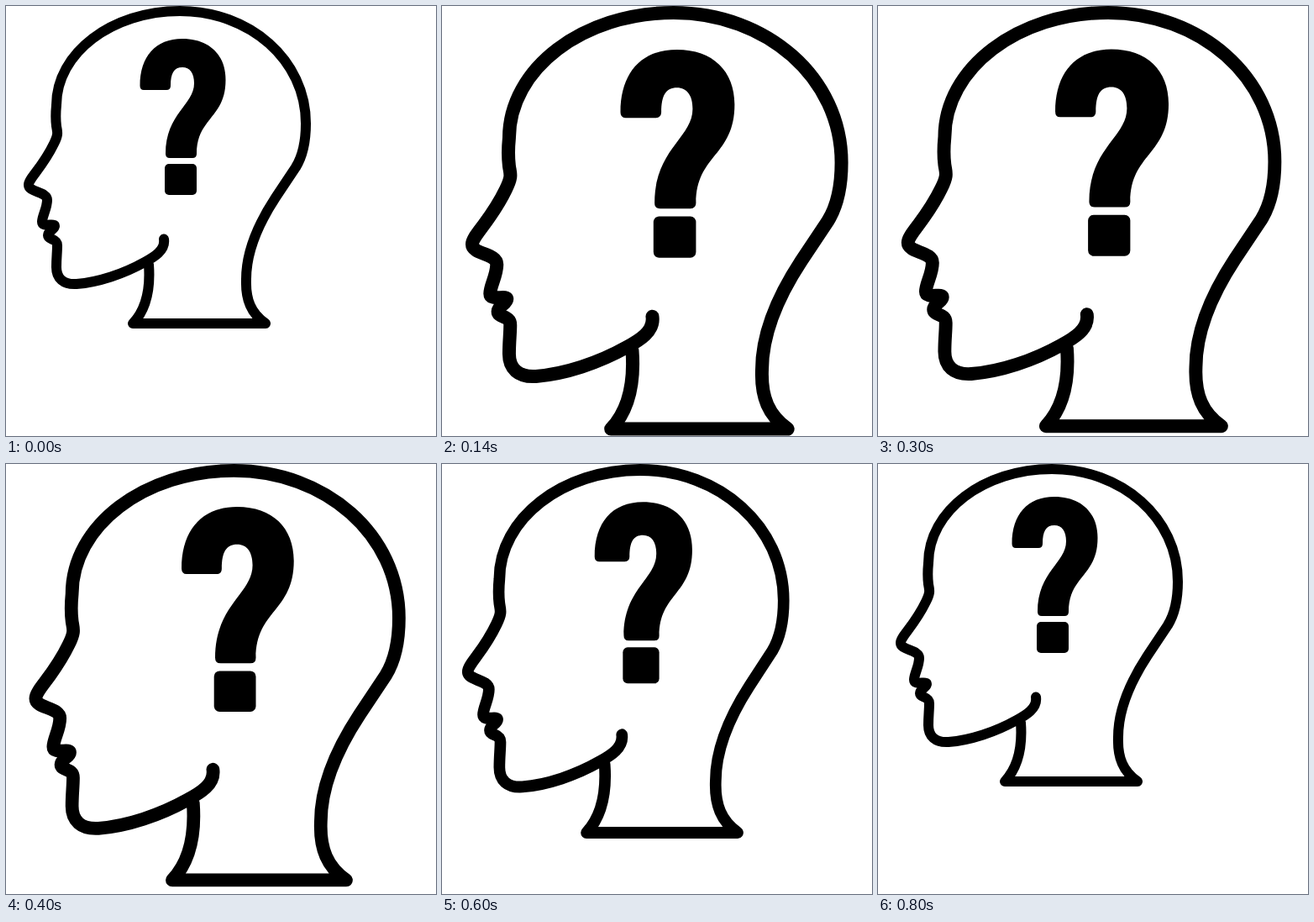
Recreate the animation shown at these times as an HTML page. Size 512 px wide and 512 px high, loop 1.6 s.

```html
<!DOCTYPE html>
<html lang="en">
<head>
<meta charset="utf-8">
<title>Thinking head</title>
<style>
  html, body { margin: 0; width: 100%; height: 100%; overflow: hidden; background: #fff; }
  svg { display: block; width: 100%; height: 100%; }
  .line { fill: none; stroke: #000; stroke-width: 12; stroke-linecap: round; stroke-linejoin: round; }
</style>
</head>
<body>
<svg viewBox="0 0 512 512">
  <g id="head">
    <path class="line" d="M188 277.500C190 291 176 299 165 305C140 319 110 329 84 331
      C68 332 60 324 60 311C60 300 61 293 61 285C61 276 50 279 50 273
      C50 268 58 266 58 262C58 258 43 264 43 257C43 250 49 241 49 231
      C49 221 27 222 27 213C27 205 43 193 57 164C63 152 61 150 60 143
      C59 135 59 128 60 118C60 56 126 6 207 6C290 6 357 64 357 140
      C357 160 353 179 345 192L321 228C300 260 286 292 286 325
      C285 350 292 366 309 378H151C168 360 172 335 170 308"/>
    <path d="M164 100Q159.500 100 159.500 95C159.500 60 178 39 210 39
      C242 39 261.500 58 261.500 88C261.500 134 227 133 227 176
      Q227 181 222 181H195Q190 181 190 176C190 128 224 118 224 92
      C224 80 219 73 210 73C200 73 196 80 196 95Q196 100 191 100Z"/>
    <rect x="189" y="188" width="38" height="37" rx="5"/>
  </g>
</svg>
<script>
  const LOOP = 1600;
  const head = document.getElementById('head');

  // [time in ms, scale x, scale y]
  const keys = [
    [0, 1, 1],
    [164, 1.351, 1.351],
    [385, 1.31, 1.31],
    [540, 1.331, 1.331],
    [660, 0.957, 1],
    [800, 1, 1],
    [LOOP, 1, 1]
  ];

  const ease = p => p * p * (3 - 2 * p);

  function scaleAt(t) {
    const i = keys.findIndex(k => t < k[0]);
    const [a, b] = [keys[i - 1], keys[i]];
    const p = ease((t - a[0]) / (b[0] - a[0]));
    return [1, 2].map(n => a[n] + (b[n] - a[n]) * p);
  }

  const start = performance.now();
  function draw() {
    const t = (performance.now() - start) % LOOP;
    head.setAttribute('transform', `scale(${scaleAt(t)})`);
    requestAnimationFrame(draw);
  }
  draw();
</script>
</body>
</html>
```
